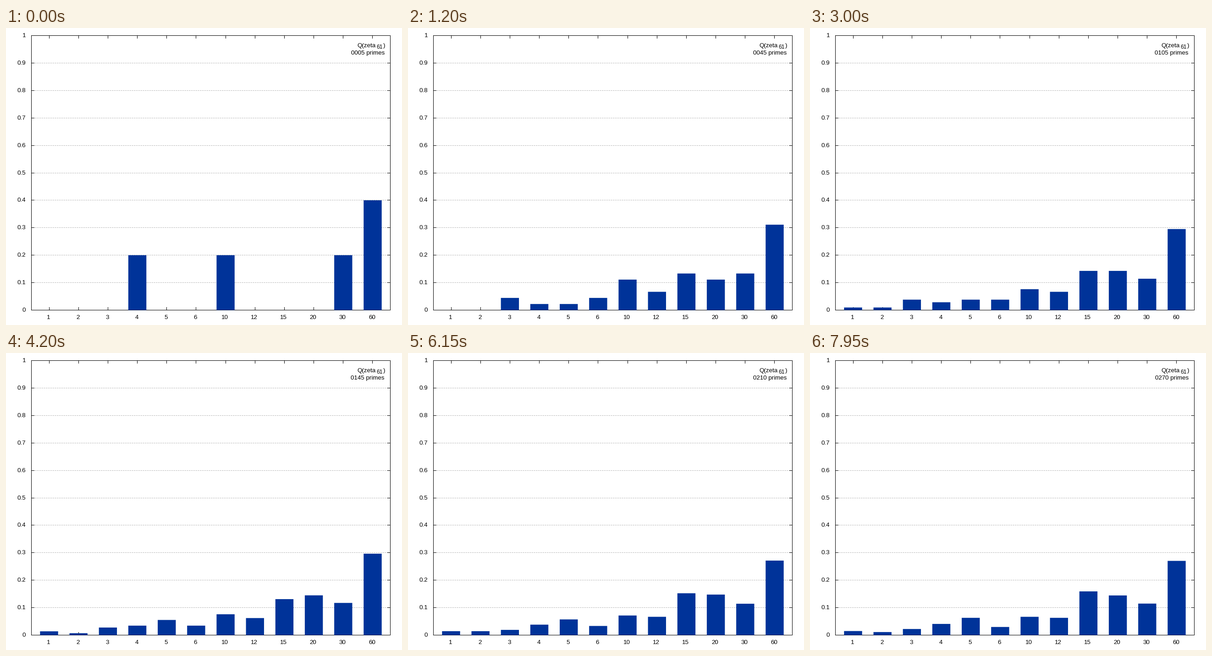
These frames come from a looping animation (864 px wide and 648 px high, 8000 ms). A matplotlib script:

```python
import matplotlib.pyplot as plt
from matplotlib.animation import FuncAnimation
from matplotlib.patches import Rectangle

WIDTH, HEIGHT, DPI = 864, 648, 96
# Pixel centres of the plot border
LEFT, RIGHT, TOP, BOTTOM = 55.5, 838.5, 16.5, 615.5
MODULUS = 61
ORDERS = [d for d in range(1, MODULUS) if (MODULUS - 1) % d == 0]
PITCH = (RIGHT - LEFT) / (len(ORDERS) + 0.2)
HALF_BAR = 19.7
TICK = 6
PRIMES_PER_STEP = 5
INTERVAL, TICKS_PER_STEP, FRAMES = 50, 3, 160

plt.rcParams["font.family"] = "Liberation Sans"


def multiplicative_order(n):
    power, order = n % MODULUS, 1
    while power != 1:
        power, order = power * n % MODULUS, order + 1
    return order


def primes_without_modulus(count):
    found, n = [], 2
    while len(found) < count:
        if n != MODULUS and all(n % d for d in range(2, int(n**0.5) + 1)):
            found.append(n)
        n += 1
    return found


def pixel_center(v):
    return int(v) + 0.5


steps = (FRAMES - 1) // TICKS_PER_STEP + 1
prime_orders = [multiplicative_order(p)
                for p in primes_without_modulus(steps * PRIMES_PER_STEP)]

fig = plt.figure(figsize=(WIDTH / DPI, HEIGHT / DPI), dpi=DPI, facecolor="white")
ax = fig.add_axes([0, 0, 1, 1])
ax.set_xlim(0, WIDTH)
ax.set_ylim(HEIGHT, 0)
ax.axis("off")


def line(x0, y0, x1, y1, color="black", zorder=2, **style):
    ax.plot([x0, x1], [y0, y1], color=color, lw=0.75, zorder=zorder,
            snap=False, **style)


def label(x, y, text, align="left", size=10):
    return ax.text(x, y, text, ha=align, va="baseline", fontsize=size, zorder=5)


for i in range(11):
    y = pixel_center(BOTTOM - (BOTTOM - TOP) * i / 10)
    if 0 < i < 10:
        line(LEFT - 0.5, y, RIGHT, y, color="#a0a0a0", zorder=1,
             dashes=(2, 2), dash_capstyle="butt")
    line(LEFT, y, LEFT + TICK, y)
    line(RIGHT - TICK, y, RIGHT, y)
    label(43, y + 3.5, f"{i / 10:g}", "right")

bars = []
for k, order in enumerate(ORDERS):
    center = LEFT + (k + 0.6) * PITCH
    x = pixel_center(center)
    line(x, BOTTOM - TICK, x, BOTTOM)
    line(x, TOP, x, TOP + TICK)
    label(center - 1.5, 635, str(order), "center")
    bar = Rectangle((center - HALF_BAR, BOTTOM), 2 * HALF_BAR, 0,
                    facecolor="#003399", linewidth=0, snap=False, zorder=3)
    bars.append(ax.add_patch(bar))

ax.add_patch(Rectangle((LEFT, TOP), RIGHT - LEFT, BOTTOM - TOP, fill=False,
                       edgecolor="black", lw=0.75, snap=False, zorder=2))

label(766, 42, "Q(zeta")
label(808, 45, str(MODULUS), size=9)
label(823, 42, ")")
counter = label(826, 58, "", "right")


def update(frame):
    total = (frame // TICKS_PER_STEP + 1) * PRIMES_PER_STEP
    seen = prime_orders[:total]
    for bar, order in zip(bars, ORDERS):
        height = (BOTTOM - TOP) * seen.count(order) / total
        bar.set_y(BOTTOM - height)
        bar.set_height(height)
    counter.set_text(f"{total:04d} primes")
    return [*bars, counter]


anim = FuncAnimation(fig, update, frames=FRAMES, interval=INTERVAL,
                     repeat=True, repeat_delay=0, blit=False)
plt.show()
```
